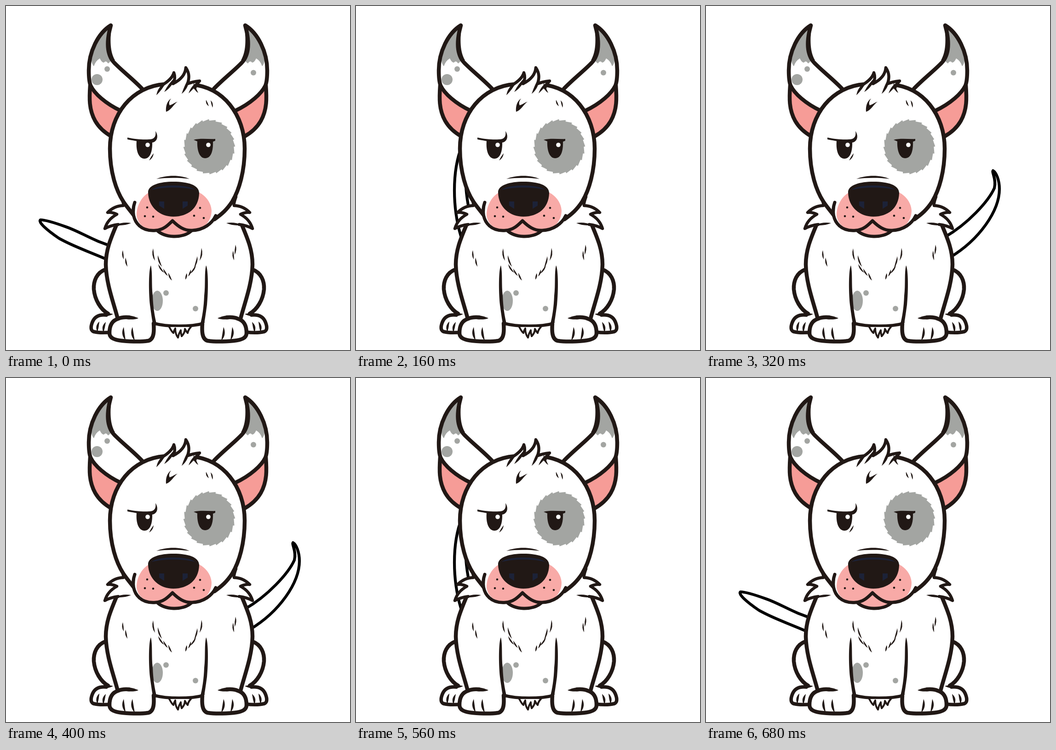
Recreate the animation shown at these times as an HTML page with a canvas. Size 748x748 px, loop 720 ms.

```html
<!DOCTYPE html>
<html lang="en">
<head>
<meta charset="utf-8">
<title>Dog wagging its tail</title>
<style>
html, body { margin: 0; width: 100%; height: 100%; overflow: hidden; background: #fff; }
canvas { display: block; width: 100vmin; height: 100vmin; }
</style>
</head>
<body>
<canvas id="stage" width="748" height="748"></canvas>
<script>
const ctx = document.getElementById('stage').getContext('2d');
const INK = '#211815', GREY = '#a3a5a2', EAR = '#f69c97', MUZZLE = '#f8aaa7', NAVY = '#1c2238';
const LINE = 8.5, STEP = 40, LOOP = 720;

function shape(d, fill, width, stroke = INK) {
  const path = new Path2D(d);
  if (fill) { ctx.fillStyle = fill; ctx.fill(path); }
  if (width) { ctx.strokeStyle = stroke; ctx.lineWidth = width; ctx.stroke(path); }
}

function oval(x, y, rx, ry, fill) {
  ctx.fillStyle = fill;
  ctx.beginPath();
  ctx.ellipse(x, y, rx, ry, 0, 0, Math.PI * 2);
  ctx.fill();
}

const dot = (x, y, r, fill) => oval(x, y, r, r, fill);

// A hair: a lens, pointed at both ends, bowed sideways by bend.
function hair(x1, y1, x2, y2, bend = 0, w = 3.2) {
  const len = Math.hypot(x2 - x1, y2 - y1);
  const nx = (y1 - y2) / len, ny = (x2 - x1) / len;
  const mx = (x1 + x2) / 2, my = (y1 + y2) / 2;
  ctx.fillStyle = INK;
  ctx.beginPath();
  ctx.moveTo(x1, y1);
  ctx.quadraticCurveTo(mx + nx * (bend + w), my + ny * (bend + w), x2, y2);
  ctx.quadraticCurveTo(mx + nx * (bend - w), my + ny * (bend - w), x1, y1);
  ctx.fill();
}

// Runs draw reflected so that x becomes sum - x.
function mirrored(sum, draw) {
  ctx.save();
  ctx.transform(-1, 0, 0, 1, sum, 0);
  draw();
  ctx.restore();
}

function both(sum, draw) {
  draw();
  mirrored(sum, draw);
}

const TAIL = {
  low: 'M240 525C190 512 165 492 130 480C105 471 85 465 75 465C69 470 90 488 115 505C150 525 180 533 240 560',
  mid: 'M222 545C190 515 165 450 165 395C165 370 168 352 172 348C178 352 177 380 186 412C194 445 212 480 234 512',
  high: 'M228 500C210 440 208 360 230 305C240 340 234 400 248 450',
  highRight: 'M520 490C538 450 538 380 520 325C520 370 510 420 495 450',
  curled: 'M530 547C595 508 638 445 638 398C638 378 631 362 624 358C621 362 632 376 627 396C614 425 569 474 520 502'
};

// Poses from far left to far right; the middle one is hidden by the body.
const POSES = [
  [TAIL.low], [TAIL.curled, true], [TAIL.mid], [TAIL.high], null,
  [TAIL.highRight], [TAIL.mid, true], [TAIL.curled], [TAIL.low, true]
];

function tail(time) {
  const tick = Math.floor((time % LOOP) / STEP);
  const step = tick < 3 ? tick : tick - 1;
  const pose = POSES[step <= 8 ? step : 16 - step];
  if (!pose) return;
  const draw = () => shape(pose[0], '#fff', 6.2, '#000');
  if (pose[1]) mirrored(756, draw);
  else draw();
}

function hindLeg() {
  shape('M216 573C197 580 190 598 191 616C193 639 206 660 222 670L250 674L245 570Z', '#fff');
  shape('M216 573C197 580 190 598 191 616C193 639 206 660 222 669', null, LINE);
  shape('M218 672C200 670 192 677 188 687C184 697 184 705 190 708C202 711 214 711 230 709L240 674Z', '#fff');
  shape('M218 672C200 670 192 677 188 687C184 697 184 705 190 708C202 711 214 711 230 709', null, 7.5);
  hair(210, 675, 233, 670, -2, 5);
  hair(203, 686, 199, 709, 4, 5);
  hair(217, 687, 212, 710, 4, 5);
}

function torso() {
  shape('M240 474C228 505 217 530 217 562C218 605 234 645 243 684L322 690C350 698 402 698 428 690L508 684C519 645 534 605 536 562C536 530 525 505 513 474L490 420H260Z', '#fff');
  ctx.save();
  ctx.beginPath();
  ctx.rect(314, 600, 60, 90);
  ctx.clip();
  oval(329, 641, 12, 22, GREY);
  ctx.restore();
  dot(348, 624, 6, GREY);
  dot(412, 658, 6, GREY);
  both(753, () => shape('M241 474C228 505 217 530 217 562C218 605 234 645 243 680', null, LINE));
  shape('M322 690C350 698 402 698 430 690', null, 7);
  shape('M355 698C358 703 360 708 364 711C365 707 366 704 368 701C368 710 370 716 374 721C375 715 377 710 380 705C380 710 381 714 382 718C387 713 389 708 389 702C391 706 393 709 395 711C396 706 398 702 402 698', '#fff', 4);
  both(750, () => shape('M315 564C310 573 310 620 313 650C316 672 318 685 320 696L328 694C323 675 320 655 319 630C316 605 319 580 315 564Z', INK));
}

function tuft() {
  const fur = 'M251 415C254 423 256 429 255 434C241 434 230 440 221 449C228 448 235 450 241 453C228 460 219 470 215 484C224 479 234 476 244 475';
  shape(fur + 'L285 470L280 420Z', '#fff');
  shape(fur, null, 6.5);
  hair(238, 476, 272, 472, 0, 5);
}

function chestHair() {
  hair(320, 527, 324, 554, 4);
  hair(330, 542, 339, 567, 3);
  hair(331, 561, 344, 580, 3);
  hair(342, 571, 352, 587, 2);
  hair(353, 580, 361, 597, 2);
  hair(425, 526, 421, 554, -4);
  hair(416, 544, 409, 569, -3);
  hair(413, 563, 400, 582, -3);
  hair(402, 573, 396, 588, -2);
  hair(393, 581, 390, 595, -1);
  hair(254, 531, 256, 551, 2);
  hair(260, 547, 264, 567, 2);
  hair(499, 519, 497, 541, -2);
  hair(494, 532, 496, 553, 2);
}

function frontPaw() {
  const edge = 'M268 677C257 676 250 677 244 680C230 684 225 696 225 711C225 722 235 726 253 728C275 730 296 730 309 728C323 725 322 704 321 690';
  shape(edge + 'L288 678Z', '#fff');
  shape(edge, null, LINE);
  shape('M262 673C272 673 280 675 288 679C280 682 272 682 262 681Z', INK);
  hair(256, 698, 260, 727, 5, 5);
  hair(275, 698, 280, 728, 5, 5);
}

function ear() {
  shape('M183 172C181 200 180 225 194 250C202 264 214 275 230 284L252 230Z', EAR, LINE);
  shape('M228 42C200 59 180 100 180 140C180 155 181 166 184 173C192 190 216 212 250 228L296 180C278 161 255 143 239 127C215 106 220 70 228 42Z', '#fff');
  shape('M228 42C200 59 181 95 181 116L186 118Q187 127 191 131Q195 119 204 114Q208 123 213 123Q217 117 222 125L230 118C217 97 222 70 228 42Z', GREY);
}

function earLines() {
  shape('M296 180C278 161 255 143 239 127C215 106 220 70 228 42C200 59 180 100 180 140C180 155 181 166 184 173C192 190 216 212 250 228', null, LINE);
  shape('M230 39C217 61 215 92 226 116L237 118C224 96 227 65 230 39Z', INK);
}

function ears() {
  both(748, ear);
  dot(198, 160, 12, GREY);
  dot(220, 137, 6, GREY);
  dot(538, 145, 6, GREY);
  both(748, earLines);
}

function skull() {
  const left = 'M280 458C272 447 262 436 255 425C240 402 226 362 226 310C226 235 274 175 345 170';
  const right = 'M405 171C472 176 519 237 519 310C519 360 507 400 492 425C480 443 470 452 453 464';
  shape(left + right.replace('M', 'L') + 'L400 488H320Z', '#fff');
  shape(left, null, LINE);
  shape(right, null, LINE);
}

function forelock() {
  shape('M330 191C335 179 341 173 348 167C358 160 363 152 365 145C370 154 368 162 365 170C381 160 390 148 391 134C400 147 399 160 394 175C402 169 411 166 422 164C415 171 413 177 411 187L380 200Z', '#fff');
  shape('M338 173C353 164 362 156 365 145C369 155 367 162 363 169C381 160 390 148 391 134C400 147 398 158 395 169C404 165 412 164 421 163C415 169 412 173 411 178', null, 6.5);
  hair(327, 194, 348, 166, -3, 6);
  hair(344, 187, 368, 155, 2, 6);
  hair(382, 191, 398, 155, 4, 6);
  hair(397, 190, 421, 163, -3, 5);
  hair(408, 167, 418, 189, 4, 4);
  shape('M348 230C347 218 350 207 359 201C354 208 354 212 356 216C362 214 367 210 373 208C364 214 360 226 348 230Z', INK);
  hair(435, 204, 441, 218, 2, 3);
  hair(445, 205, 449, 221, -2, 3);
}

// Eye patch edged with slanted teeth.
function patch() {
  const teeth = 24;
  const at = (turn, k) => ctx.lineTo(442 + Math.cos(turn) * 55 * k, 306 + Math.sin(turn) * 58.5 * k);
  ctx.fillStyle = GREY;
  ctx.beginPath();
  for (let i = 0; i < teeth; i++) {
    const turn = i / teeth * Math.PI * 2;
    at(turn, 0.97);
    at(turn + 0.13, 0.99);
    at(turn + 0.25, 1.025);
  }
  ctx.fill();
}

function eyes() {
  shape('M284 293H318C319 317 313 332 301 332C289 332 282 316 284 293Z', INK);
  dot(308, 302, 4.8, '#fff');
  shape('M264 286C282 290 300 291 311 290C322 290 327 284 325 272C333 284 328 297 316 297C298 297 280 293 264 290Z', INK);
  hair(321, 320, 311, 336, -2, 3);
  shape('M416 293H450C451 317 445 331 433 331C421 331 415 315 416 293Z', INK);
  dot(440, 302, 4.8, '#fff');
  shape('M408 291C424 287 440 290 455 289V293C440 300 423 298 408 291Z', INK);
}

function muzzle() {
  const lip = 'M280 427C273 447 277 466 290 478C300 487 312 489 325 488C342 487 352 477 362 467C375 480 388 489 405 488C430 487 448 473 456 456';
  shape('M328 487C342 504 385 507 404 488L362 467Z', MUZZLE, 7);
  shape(lip + 'L420 400H315Z', '#fff');
  shape('M318 402C295 411 283 435 284 457C288 478 305 487 325 487C342 487 352 476 362 466C375 479 388 488 405 488C430 487 447 468 447 445C446 424 430 408 412 402Z', MUZZLE);
  shape(lip, null, 7);
  shape('M281 425C274 434 273 444 275 456L280 452Z', INK);
  for (const [x, y] of [[307, 438], [302, 457], [320, 458], [422, 439], [409, 456], [430, 461]]) {
    dot(x, y, 2.3, INK);
  }
  shape('M327 376C348 367 380 367 399 376C379 373 348 373 327 376Z', INK);
}

function nose() {
  shape('M309 406C308 389 335 382 364 382C395 382 420 389 420 407C419 440 395 458 364 458C335 458 310 438 309 406Z', INK);
  shape('M317 400C328 387 398 387 411 400C390 393 340 393 317 400Z', NAVY);
  shape('M333 425H344V441L333 434ZM384 425H395V434L384 441Z', NAVY);
}

function dog() {
  both(752, hindLeg);
  torso();
  both(751, tuft);
  chestHair();
  both(748, frontPaw);
  ears();
  skull();
  forelock();
  patch();
  eyes();
  muzzle();
  nose();
}

function frame() {
  ctx.fillStyle = '#fff';
  ctx.fillRect(0, 0, 748, 748);
  ctx.lineJoin = 'round';
  ctx.lineCap = 'round';
  tail(performance.now());
  dog();
  requestAnimationFrame(frame);
}

frame();
</script>
</body>
</html>
```
